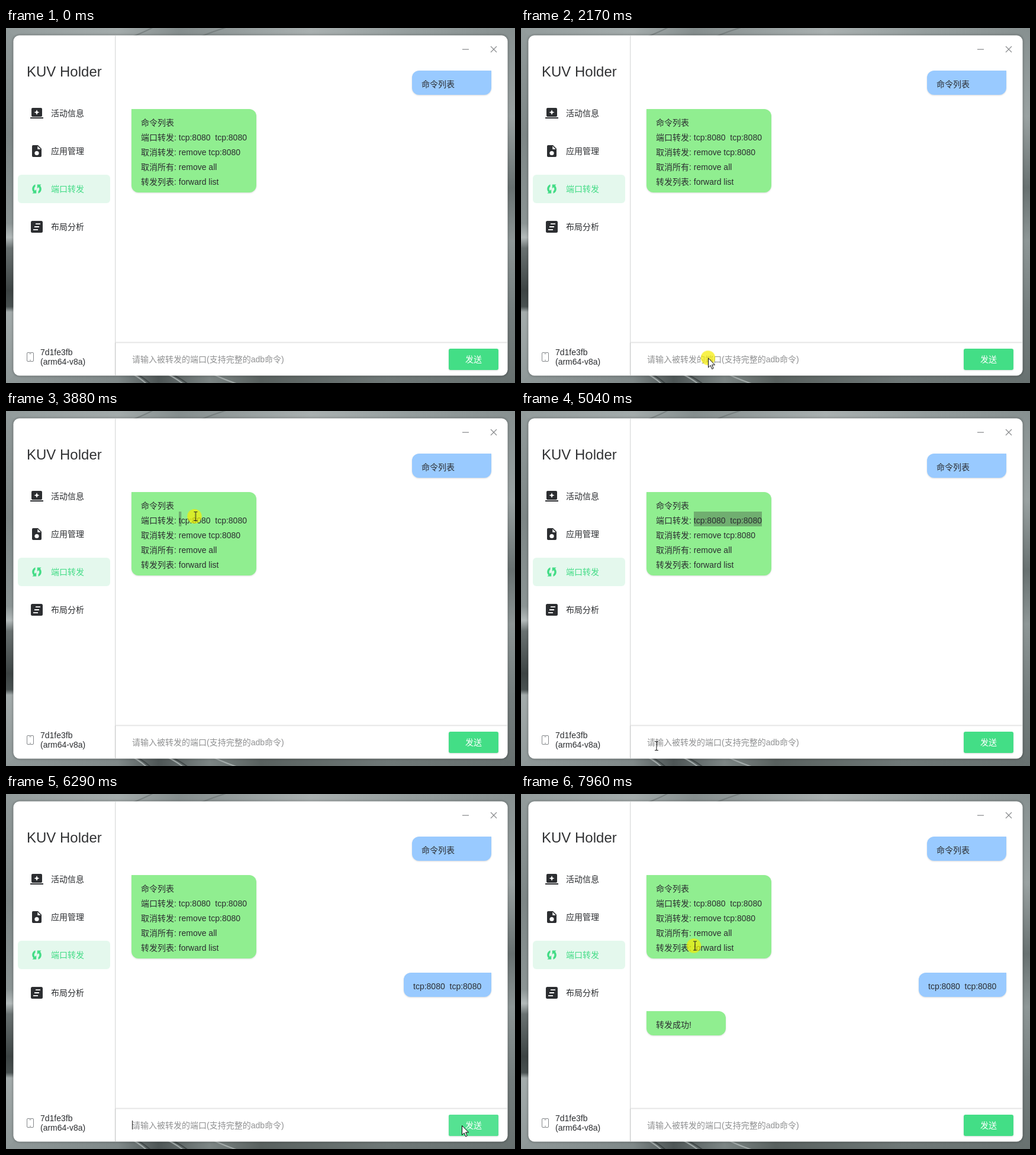
Recreate the animation shown at these times as an HTML page. Size 860 by 600 pixels, loop 8 s.

```html
<!DOCTYPE html>
<html lang="zh-CN">
<head>
<meta charset="utf-8">
<title>KUV Holder</title>
<style>
html, body { margin: 0; height: 100%; overflow: hidden; background: #848d8c; }
svg { display: block; width: 100vw; height: 100vh; }
text {
  font: 14px "Liberation Sans", "Noto Sans CJK SC", "Noto Sans CJK", sans-serif;
  fill: #2b2d30; white-space: pre;
}
.title { font-size: 24px; fill: #303133; }
.on { fill: #43dc86; }
.hint { fill: #8f9091; }
.ink { fill: #2c2e31; }
.blue { fill: #99caff; }
.green { fill: #90ee90; }
.bubble { filter: drop-shadow(0 1px 1px rgba(0,0,0,.14)); }

/* one loop is 8 s, so 1% is 80 ms */
.t { animation: 8s step-end infinite; }
#cursor { animation: move 8s linear infinite; }
#select { animation: select 8s linear infinite; transform-origin: 292px 0; }
#arrow { animation-name: arrow; }
#beam { animation-name: beam; }
#press { animation-name: press; }
#caret { animation-name: caret; }
#pasted { animation-name: pasted; }
#hint { animation-name: hint; }
#hover { animation-name: hover; }
#sent { animation-name: sent; }
#reply { animation-name: reply; }

@keyframes move {
  0%, 10.6% { transform: translate(428px, 604px); }
  11% { transform: translate(426px, 592px); }
  14% { transform: translate(398px, 570px); }
  18% { transform: translate(360px, 548px); }
  20.25%, 21% { transform: translate(345px, 543px); }
  23.6% { transform: translate(234px, 534px); }
  25.2% { transform: translate(290px, 550px); }
  26.5%, 28% { transform: translate(316px, 557.5px); }
  30.6%, 31.4% { transform: translate(329px, 559px); }
  34% { transform: translate(322px, 430px); }
  37.5% { transform: translate(304px, 230px); }
  40.1%, 41.7% { transform: translate(297px, 183px); }
  45%, 47.6% { transform: translate(292px, 179px); }
  48.5% { transform: translate(318px, 178px); }
  51.1% { transform: translate(402px, 176px); }
  52.5%, 54% { transform: translate(409px, 177px); }
  55.5%, 56.5% { transform: translate(392px, 205px); }
  59% { transform: translate(300px, 400px); }
  61.4% { transform: translate(205px, 558px); }
  62.6%, 69% { transform: translate(227px, 566px); }
  71% { transform: translate(520px, 560px); }
  73.2%, 76% { transform: translate(773px, 559px); }
  78%, 80% { transform: translate(770px, 560px); }
  84%, 86.2% { transform: translate(758px, 548.5px); }
  89.2% { transform: translate(490px, 430px); }
  92% { transform: translate(372px, 315px); }
  95.2%, 100% { transform: translate(292px, 256.5px); }
}
@keyframes select {
  0%, 48.2% { transform: scaleX(0); }
  48.5% { transform: scaleX(.033); }
  51.1% { transform: scaleX(.93); }
  52%, 65.4% { transform: scaleX(1); }
  65.5%, 100% { transform: scaleX(0); }
}
@keyframes arrow {
  0% { opacity: 0; }
  10.8% { opacity: 1; }
  29% { opacity: 0; }
  31.8% { opacity: 1; }
  37% { opacity: 0; }
  57.5% { opacity: 1; }
  61% { opacity: 0; }
  71.8% { opacity: 1; }
  93.4%, 100% { opacity: 0; }
}
@keyframes beam {
  0% { opacity: 0; }
  29% { opacity: 1; }
  31.8% { opacity: 0; }
  37% { opacity: 1; }
  57.5% { opacity: 0; }
  61% { opacity: 1; }
  71.8% { opacity: 0; }
  93.4%, 100% { opacity: 1; }
}
@keyframes press {
  0% { opacity: 0; }
  26.75% { opacity: 1; }
  31.4% { opacity: 0; }
  45% { opacity: 1; }
  54% { opacity: 0; }
  99.4%, 100% { opacity: 1; }
}
@keyframes caret {
  0% { opacity: 0; transform: none; }
  31.5% { opacity: 1; }
  37.75% { opacity: 0; }
  44% { opacity: 1; }
  45% { opacity: 0; }
  65.5% { opacity: 1; transform: none; }
  69% { opacity: 1; transform: translateX(115px); }
  75.25% { opacity: 0; transform: none; }
  78.6% { opacity: 1; }
  84.9% { opacity: 0; }
  91.1% { opacity: 1; }
  97.7%, 100% { opacity: 0; transform: none; }
}
@keyframes pasted {
  0% { opacity: 0; }
  69% { opacity: 1; }
  78.6%, 100% { opacity: 0; }
}
@keyframes hint {
  0% { opacity: 1; }
  69% { opacity: 0; }
  78.6%, 100% { opacity: 1; }
}
@keyframes hover {
  0% { opacity: 0; }
  72.9% { opacity: 1; }
  86.5%, 100% { opacity: 0; }
}
@keyframes sent {
  0% { opacity: 0; }
  78.6%, 100% { opacity: 1; }
}
@keyframes reply {
  0% { opacity: 0; }
  87%, 100% { opacity: 1; }
}
</style>
</head>
<body>
<svg viewBox="0 0 860 600" preserveAspectRatio="none">
  <defs>
    <linearGradient id="top">
      <stop offset="0" stop-color="#939c9c"/><stop offset=".22" stop-color="#a3abab"/>
      <stop offset=".34" stop-color="#858e8e"/><stop offset=".6" stop-color="#a9b0b0"/>
      <stop offset=".8" stop-color="#949d9d"/><stop offset="1" stop-color="#879090"/>
    </linearGradient>
    <linearGradient id="left" x2="0" y2="1">
      <stop offset="0" stop-color="#939c9c"/><stop offset=".3" stop-color="#7d8686"/>
      <stop offset=".55" stop-color="#8c9595"/><stop offset=".59" stop-color="#b4bbbb"/>
      <stop offset=".62" stop-color="#6a7272"/><stop offset=".74" stop-color="#3d4444"/>
      <stop offset=".785" stop-color="#4a5252"/><stop offset=".8" stop-color="#a4acac"/>
      <stop offset="1" stop-color="#8f9898"/>
    </linearGradient>
    <linearGradient id="right" x2="0" y2="1">
      <stop offset="0" stop-color="#879090"/><stop offset=".25" stop-color="#9aa2a2"/>
      <stop offset=".45" stop-color="#687171"/><stop offset=".6" stop-color="#8e9797"/>
      <stop offset=".8" stop-color="#747d7d"/><stop offset="1" stop-color="#687170"/>
    </linearGradient>
    <linearGradient id="bottom">
      <stop offset="0" stop-color="#8f9898"/><stop offset=".22" stop-color="#808989"/>
      <stop offset=".3" stop-color="#4e5656"/><stop offset=".4" stop-color="#7d8685"/>
      <stop offset=".5" stop-color="#59615f"/><stop offset=".75" stop-color="#6f7877"/>
      <stop offset="1" stop-color="#687170"/>
    </linearGradient>
    <filter id="shade" x="-5%" y="-5%" width="110%" height="110%">
      <feDropShadow dx="0" dy="0" stdDeviation="2" flood-color="#000" flood-opacity=".45"/>
    </filter>
  </defs>

  <!-- wallpaper -->
  <rect width="860" height="30" fill="url(#top)"/>
  <rect y="570" width="860" height="30" fill="url(#bottom)"/>
  <path d="M0 0L30 30V570L0 600Z" fill="url(#left)"/>
  <path d="M860 0L830 30V570L860 600Z" fill="url(#right)"/>
  <g fill="none" stroke-width="2">
    <path d="M205 580Q225 590 238 602M262 580Q285 590 300 602M340 580Q362 592 392 602" stroke="#a3abaa"/>
    <path d="M212 580Q232 590 245 602M270 580Q292 590 308 602" stroke="#363d3c" opacity=".7"/>
    <path d="M215 14Q238 5 250 -2M330 14Q352 5 375 -2" stroke="#687070" opacity=".6"/>
  </g>

  <!-- window -->
  <rect x="12.5" y="12.5" width="835" height="575" rx="10" fill="#fff" filter="url(#shade)"/>
  <path d="M184.5 13V587" stroke="#dcdddd"/>
  <path d="M185.5 13V587" stroke="#f3f3f3"/>
  <path d="M185 531.5H847" stroke="#e6e6e6" stroke-width="2"/>
  <path d="M184.5 532V587" stroke="#c6c7c7"/>
  <path d="M771 36.2H782M819 31L829 41M829 31L819 41" stroke="#8a8c8e" stroke-width="1.2" fill="none"/>

  <!-- sidebar -->
  <text class="title" x="35" y="82">KUV Holder</text>
  <rect x="20" y="248" width="156" height="48" rx="6" fill="#e4f8ed"/>
  <text x="76" y="149">活动信息</text>
  <text x="76" y="213">应用管理</text>
  <text x="76" y="277" class="on">端口转发</text>
  <text x="76" y="341">布局分析</text>

  <g class="ink">
    <rect x="43" y="135" width="18" height="15" rx="2"/>
    <rect x="41" y="151" width="22" height="2"/>
    <path d="M46 198H54L60 204V216Q60 218 58 218H46Q44 218 44 216V200Q44 198 46 198Z"/>
    <rect x="42" y="326" width="20" height="20" rx="2.5"/>
  </g>
  <g fill="#fff">
    <path d="M52 138L53.3 141.2L56.5 142.5L53.3 143.8L52 147L50.7 143.8L47.5 142.5L50.7 141.2Z"/>
    <path d="M53.3 199.5V205H58.7Z"/>
    <circle cx="52" cy="211.5" r="3.6"/>
    <path d="M50 330.2H58V332H50ZM48 335.1H56V336.9H48ZM46 340H54V341.8H46Z"/>
  </g>
  <g class="on">
    <path id="half" d="M49.5 264.3A8.2 8.2 0 0 0 46.4 277.6L44.4 279.6H51.2V272.8L48.9 275.1A4.8 4.8 0 0 1 49.5 268Z"/>
    <use href="#half" transform="rotate(180 52 272)"/>
  </g>

  <g fill="none" stroke="#85888b">
    <rect x="35.5" y="548.5" width="11" height="15" rx="1.5"/>
    <path d="M39.5 550.5H42.5M40 561.5H42"/>
  </g>
  <text x="58" y="553">7d1fe3fb</text>
  <text x="58" y="569">(arm64-v8a)</text>

  <!-- chat -->
  <path class="blue bubble" d="M698 72H820V101A12 12 0 0 1 808 113H698A12 12 0 0 1 686 101V84A12 12 0 0 1 698 72Z"/>
  <text x="702" y="100">命令列表</text>

  <path class="green bubble" d="M212 137H411A12 12 0 0 1 423 149V266A12 12 0 0 1 411 278H224A12 12 0 0 1 212 266Z"/>
  <rect id="select" x="292" y="170" width="115" height="25" fill="#70ae70"/>
  <text x="228" y="165">命令列表</text>
  <text x="228" y="190">端口转发: tcp:8080  tcp:8080</text>
  <text x="228" y="215">取消转发: remove tcp:8080</text>
  <text x="228" y="240">取消所有: remove all</text>
  <text x="228" y="265">转发列表: forward list</text>

  <g id="sent" class="t">
    <path class="blue bubble" d="M684 302H820V331A12 12 0 0 1 808 343H684A12 12 0 0 1 672 331V314A12 12 0 0 1 684 302Z"/>
    <text x="688" y="330">tcp:8080  tcp:8080</text>
  </g>
  <g id="reply" class="t">
    <path class="green bubble" d="M212 367H334A12 12 0 0 1 346 379V396A12 12 0 0 1 334 408H224A12 12 0 0 1 212 396Z"/>
    <text x="228" y="395">转发成功!</text>
  </g>

  <!-- input row -->
  <text id="hint" class="t hint" x="213" y="565">请输入被转发的端口(支持完整的adb命令)</text>
  <text id="pasted" class="t" x="213" y="565">tcp:8080  tcp:8080</text>
  <rect id="caret" class="t" x="213" y="552" width="1" height="15" fill="#111"/>
  <g class="bubble">
    <rect x="748" y="542" width="84" height="36" rx="3" fill="#43de86"/>
    <rect id="hover" class="t" x="748" y="542" width="84" height="36" rx="3" fill="#55e292"/>
  </g>
  <text x="790" y="565" text-anchor="middle" style="fill:#fff">发送</text>

  <!-- pointer -->
  <g id="cursor">
    <circle id="press" class="t" r="12.2" fill="#f5ec00" fill-opacity=".7"/>
    <path id="arrow" class="t" d="M.5 .5V16.2L4.1 12.8L6.7 18.8L9.2 17.7L6.6 11.9H11.6Z" fill="#fff" stroke="#000"/>
    <path id="beam" class="t" d="M-1 -7.5H1.2L2 -6.8L2.8 -7.5H5M2 -7V7M-1 7.5H1.2L2 6.8L2.8 7.5H5" fill="none" stroke="#222" stroke-width="1.1"/>
  </g>
</svg>
</body>
</html>
```
